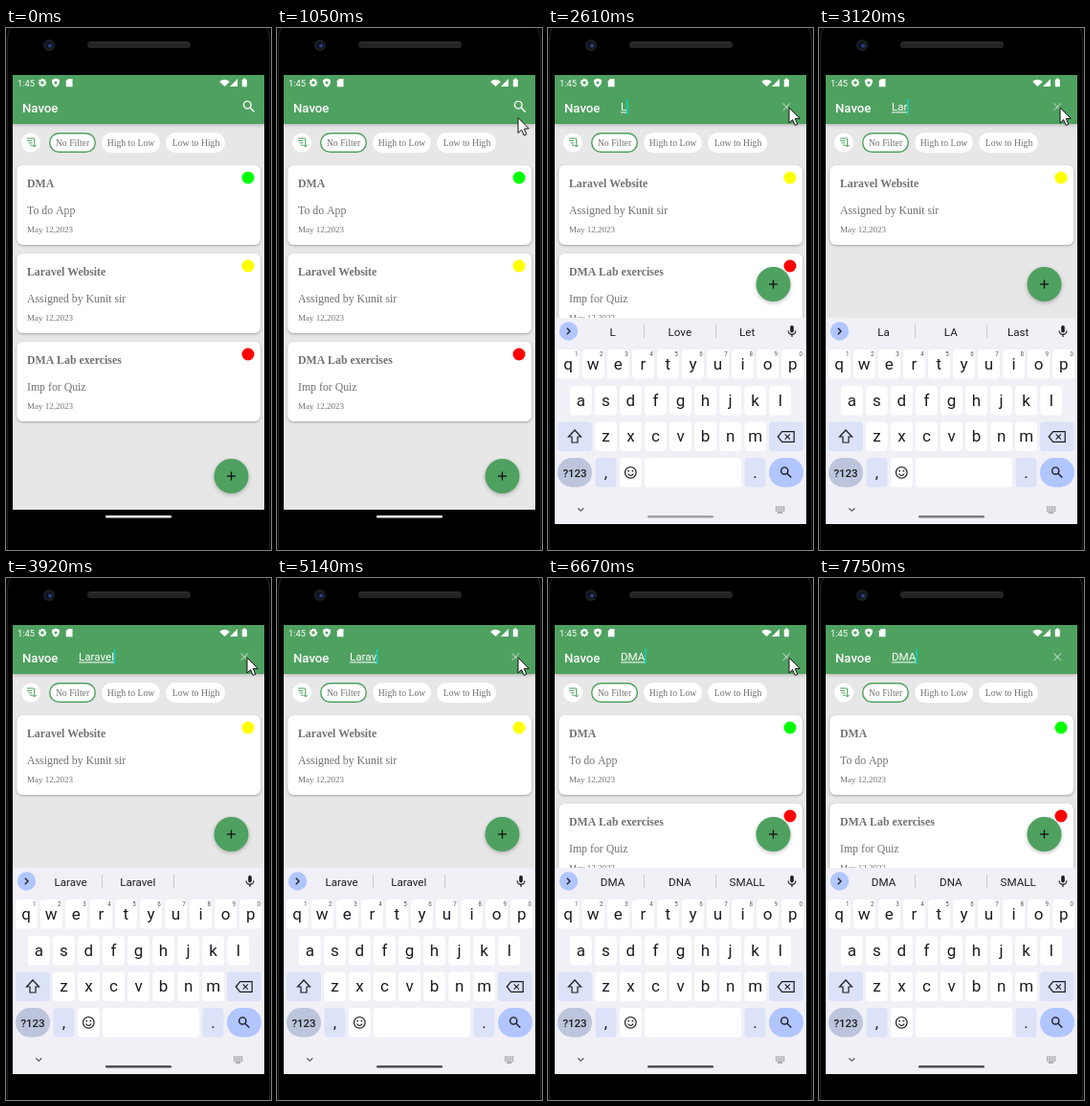
Animation of 277x544 px, one loop 8 s. Source, as an HTML page with a canvas:

```html
<!DOCTYPE html>
<html lang="en">
<head>
<meta charset="utf-8">
<title>Todo search</title>
<style>
html, body { margin: 0; width: 100%; height: 100%; overflow: hidden; background: #000; }
canvas { display: block; width: 277px; height: 544px; }
</style>
</head>
<body>
<canvas id="stage"></canvas>
<script>
const W = 277, H = 544, LOOP = 8000;
const canvas = document.getElementById('stage');
const ratio = window.devicePixelRatio || 1;
canvas.width = W * ratio;
canvas.height = H * ratio;
const c = canvas.getContext('2d');

const SANS = 'Roboto, sans-serif', SERIF = '"Liberation Serif", serif';
const GREEN = '#4fa160', INK = '#1c1c22', SOFT = 'rgba(255,255,255,.45)';
const GRAY = '#727272', LILAC = '#dce2f8', BLUE = '#b1c5ff';

const tasks = [
  { title: 'DMA', note: 'To do App', dot: '#00ff00' },
  { title: 'Laravel Website', note: 'Assigned by Kunit sir', dot: '#ffff00' },
  { title: 'DMA Lab exercises', note: 'Imp for Quiz', dot: '#ff0000' }
];

// Tracks: [start time, value...]
const mouse = [[0], [530, 229, 348], [650, 250, 149], [1050, 252, 93.5], [1170, 252, 88.5],
  [1320, 252, 83], [7230, 259, 91], [7350]];
const typed = [[0, ''], [2490, 'L'], [3000, 'La'], [3120, 'Lar'], [3240, 'Lara'], [3380, 'Larav'],
  [3650, 'Laravel'], [4740, 'Larave'], [5140, 'Larav'], [5260, 'La'], [5380, ''],
  [6270, 'D'], [6550, 'DM'], [6670, 'DMA']];
const hints = [[0, ''], [2610, 'L,Love,Let'], [3000, 'La,LA,Last'], [3240, 'Lar,Large,Larry'],
  [3380, 'Lara,Large,Larry'], [3650, 'Larav,Larave,'], [3920, 'Larave,Laravel,'], [5530, ''],
  [6270, 'D,Do,Did'], [6550, 'DM,DMs,Done'], [6670, 'DMA,DNA,SMALL']];
const caret = [[0, true], [4470, false], [4740, true], [5840, false], [6270, true], [7230, false], [7750, true]];
const slide = [[0, null], [1980, 49.5], [2130, 12], [2250, 0]];
const pill = [[0, '#f4f4f4'], [2610, '#a4a4a8'], [2850, '#7e7e83'], [3650, '#505055']];

const at = (track, t) => track.filter(s => s[0] <= t).pop();

function box(x, y, w, h, r, fill) {
  c.beginPath();
  c.roundRect(x, y, w, h, r);
  if (fill) { c.fillStyle = fill; c.fill(); }
}
function disc(x, y, r, fill) {
  c.beginPath();
  c.arc(x, y, r, 0, 7);
  c.fillStyle = fill;
  c.fill();
}
function line(color, width, ...pts) {
  c.beginPath();
  for (let i = 0; i < pts.length; i += 2) c.lineTo(pts[i], pts[i + 1]);
  outline(color, width);
}
function outline(color, width) {
  c.strokeStyle = color;
  c.lineWidth = width;
  c.stroke();
}
function text(s, x, y, font, color, align = 'left') {
  c.font = font;
  c.fillStyle = color;
  c.textAlign = align;
  c.fillText(s, x, y);
}
function shadow(blur, dy, alpha) {
  c.shadowColor = `rgba(0,0,0,${alpha})`;
  c.shadowBlur = blur * ratio;
  c.shadowOffsetY = dy * ratio;
}
const flat = () => shadow(0, 0, 0);

function lens(x, y, r, color, w) {
  c.beginPath();
  c.arc(x - r * .35, y - r * .35, r, 0, 7);
  outline(color, w);
  line(color, w, x + r * .4, y + r * .4, x + r * 1.6, y + r * 1.6);
}
function gear(x, y, r, fill, hole) {
  c.beginPath();
  for (let i = 0; i < 32; i++) {
    const a = i * Math.PI / 16, d = (i + 1) % 4 < 2 ? r : r * .8;
    c.lineTo(x + d * Math.cos(a), y + d * Math.sin(a));
  }
  c.fillStyle = fill;
  c.fill();
  disc(x, y, r * .4, hole);
}
function mic(x, y) {
  box(x - 1.8, y - 6, 3.6, 7.5, 1.8, INK);
  c.beginPath();
  c.arc(x, y - .5, 3.9, 0, Math.PI);
  outline(INK, 1.2);
  line(INK, 1.2, x, y + 3.4, x, y + 6);
}

function phone() {
  c.fillStyle = '#000';
  c.fillRect(0, 0, W, H);
  box(1.5, -14, 274, 600, 26);
  outline('#202022', 1.2);
  disc(45, 18, 6, '#1d1e22');
  disc(45, 18, 3.8, '#10131f');
  disc(46, 18.5, 2, '#2c3f86');
  box(85, 14, 108, 7, 3, '#242426');
  line('#323234', 1, 88, 15, 190, 15);
}

function statusBar() {
  text('1:45', 12, 60.5, '9.3px ' + SANS, '#fff');
  gear(38, 57, 4.4, '#fff', GREEN);
  c.beginPath();
  c.moveTo(52, 52.5);
  c.lineTo(56, 54);
  c.quadraticCurveTo(56.3, 59.5, 52, 61.8);
  c.quadraticCurveTo(47.7, 59.5, 48, 54);
  c.fillStyle = '#fff';
  c.fill();
  disc(52, 57, 1.5, GREEN);
  c.beginPath();
  [[65, 53], [69.5, 53], [69.5, 61.3], [62.8, 61.3], [62.8, 55.3]].forEach(p => c.lineTo(...p));
  c.fillStyle = '#fff';
  c.fill();
  c.beginPath();
  c.moveTo(228.5, 61);
  c.arc(228.5, 61, 7.3, -Math.PI * .76, -Math.PI * .24);
  c.fill();
  c.beginPath();
  [[242, 53], [242, 61], [234, 61]].forEach(p => c.lineTo(...p));
  c.fill();
  box(246.8, 53.4, 5, 7.8, .8, '#fff');
  c.fillRect(248.3, 52.4, 2, 1.4);
}

function appBar(t) {
  shadow(4, 1, .25);
  c.fillStyle = GREEN;
  c.fillRect(7, 49, 263, 51);
  flat();
  statusBar();
  text('Navoe', 17, 87.5, '500 13.2px ' + SANS, '#fff');
  if (t < 1860) {
    lens(253.6, 81.5, 3.8, '#fff', 1.4);
    return;
  }
  line(SOFT, 1.1, 245.5, 78.5, 253, 86);
  line(SOFT, 1.1, 253, 78.5, 245.5, 86);
  const query = at(typed, t)[1];
  if (query) {
    text(query, 76, 86, '11.6px ' + SANS, '#fff');
  } else {
    lens(84.6, 82.8, 3.4, SOFT, 1.1);
    text('Search your Todo task h…', 95.5, 87, '11.6px ' + SANS, SOFT);
  }
  c.font = '11.6px ' + SANS;
  const w = c.measureText(query).width;
  c.fillStyle = '#fff';
  c.fillRect(76, 87.4, w, 1);
  if (at(caret, t)[1]) {
    c.fillStyle = '#03dac5';
    c.fillRect(76 + w - .2, 74, 1.3, 16);
  }
}

function chips() {
  const font = '9.7px ' + SERIF;
  disc(26, 119.5, 10, '#fff');
  [[22, 115, 29], [22, 117.4, 27.5], [23.5, 119.8, 27.5], [25, 122.2, 27.5]]
    .forEach(([x, y, end]) => line(GREEN, 1, x, y, end, y));
  line(GREEN, 1.1, 29.7, 115, 29.7, 123.5);
  line(GREEN, 1, 27.7, 121.8, 29.7, 124, 31.7, 121.8);
  box(45.7, 109.7, 47.6, 19.6, 9.8, '#fff');
  outline(GREEN, 1.4);
  box(100, 109, 61, 21, 10.5, '#fff');
  box(167, 109, 62, 21, 10.5, '#fff');
  text('No Filter', 69.5, 123, font, GRAY, 'center');
  text('High to Low', 130.5, 123, font, GRAY, 'center');
  text('Low to High', 198.5, 123, font, GRAY, 'center');
}

function card(task, y) {
  shadow(2.5, 1, .3);
  box(11.3, y, 254.7, 83, 6, '#fff');
  flat();
  text(task.title, 22, y + 23, 'bold 11.8px ' + SERIF, GRAY);
  text(task.note, 22, y + 51, '11.8px ' + SERIF, GRAY);
  text('May 12,2023', 22, y + 70, '9px ' + SERIF, GRAY);
  disc(253, y + 13, 6.5, task.dot);
}

function fab(y) {
  shadow(4, 1.5, .25);
  disc(235.5, y, 18, GREEN);
  flat();
  line('#111', 1.3, 231, y, 240, y);
  line('#111', 1.3, 235.5, y - 4.5, 235.5, y + 4.5);
}

function toolbar(words) {
  disc(21.5, 316, 9.7, BLUE);
  const d = words ? 1 : -1;
  line(INK, 1.3, 21 - d * 1.2, 312.8, 21 + d * 2, 316, 21 - d * 1.2, 319.2);
  mic(255, 316);
  if (words) {
    words.split(',').forEach((w, i) => text(w, 67.5 + i * 70.3, 320.5, '11.6px ' + SANS, INK, 'center'));
    line('#c9c9d0', 1, 100.5, 309, 100.5, 323);
    line('#c9c9d0', 1, 175.5, 309, 175.5, 323);
    return;
  }
  // sticker with a folded corner
  line(INK, 1.2, 60, 321, 54.3, 321, 54.3, 311.2, 64, 311.2, 64, 317, 60, 321);
  line(INK, 1, 60, 321, 60, 317, 64, 317);
  disc(57.4, 314.3, .8, INK);
  disc(61, 314.3, .8, INK);
  text('GIF', 96.5, 319.6, 'bold 9.5px ' + SANS, INK, 'center');
  box(129.5, 311.3, 9.2, 9.8, 1);
  outline(INK, 1.1);
  box(131.8, 309.8, 4.6, 2.8, 1, INK);
  for (const y of [314.8, 316.8, 318.8]) line(INK, .8, 131.6, y, 136.6, y);
  gear(171.5, 316, 5.6, INK, '#f1f0f7');
  line('#c9c9d0', 1, 194.5, 309, 194.5, 323);
  for (const x of [213, 217, 221]) disc(x, 316, 1.1, INK);
}

function keys() {
  const big = '17px ' + SANS;
  const key = (x, y, w, fill = '#fff', r = 4) => box(x, y, w, 30.5, r, fill);
  [['qwertyuiop', 21.2, 335], ['asdfghjkl', 34.3, 373], ['zxcvbnm', 60.4, 410.5]].forEach(([row, x0, y], n) => {
    [...row].forEach((ch, i) => {
      const x = x0 + i * 26.05;
      key(x - 11.4, y, 22.8);
      text(ch, x, y + 20.8, big, INK, 'center');
      if (!n) text(String((i + 1) % 10), x + 8.6, y + 7.4, '6.3px ' + SANS, '#55555c', 'center');
    });
  });
  key(10, 410.5, 36, LILAC);
  c.beginPath();
  [[28, 419], [34.5, 426], [31, 426], [31, 432], [25, 432], [25, 426], [21.5, 426]]
    .forEach(p => c.lineTo(...p));
  c.closePath();
  outline(INK, 1.2);
  key(231, 410.5, 36, LILAC);
  c.beginPath();
  [[240.3, 426], [244.7, 420.7], [257.2, 420.7], [257.2, 431.3], [244.7, 431.3]].forEach(p => c.lineTo(...p));
  c.closePath();
  outline(INK, 1.2);
  line(INK, 1.1, 247.7, 423.4, 252.9, 428.6);
  line(INK, 1.1, 252.9, 423.4, 247.7, 428.6);

  key(10, 448, 36, '#bcc5db', 15);
  text('?123', 28, 467.6, '500 11.5px ' + SANS, INK, 'center');
  key(49.5, 448, 22, LILAC);
  text(',', 60.5, 468.5, big, INK, 'center');
  key(75, 448, 22.8);
  c.beginPath();
  c.arc(86.3, 463.3, 5.8, 0, 7);
  outline(INK, 1.2);
  disc(84.2, 461.6, .9, INK);
  disc(88.4, 461.6, .9, INK);
  c.beginPath();
  c.arc(86.3, 463.6, 2.8, .25, Math.PI - .25);
  outline(INK, 1.1);
  key(101, 448, 101);
  key(205.5, 448, 22, LILAC);
  text('.', 216.5, 468.5, big, INK, 'center');
  key(231, 448, 36, BLUE, 15);
  lens(248.5, 462.7, 3.6, INK, 1.4);

  line('#4a4a50', 1.1, 31.3, 500.5, 34.3, 503.3, 37.3, 500.5);
  for (let i = 0; i < 15; i++) {
    c.fillStyle = '#77777d';
    c.fillRect(238 + i % 5 * 2, 498.5 + Math.floor(i / 5) * 2, 1.2, 1.2);
  }
  c.fillRect(240, 504.5, 5.2, 1.1);
}

function keyboard(dy, words) {
  c.save();
  c.beginPath();
  c.rect(7, 302, 263, 215);
  c.clip();
  c.fillStyle = '#fff';
  c.fillRect(7, 302, 263, 215);
  // fades in while it rises, under a scrim on the navigation bar
  c.globalAlpha = 1 - dy / 300;
  c.translate(0, dy);
  c.fillStyle = '#f1f0f7';
  c.fillRect(7, 301.5, 263, 216);
  toolbar(words);
  keys();
  c.translate(0, -dy);
  c.globalAlpha = dy / 200;
  c.fillStyle = '#000';
  c.fillRect(7, 502, 263, 15);
  c.restore();
}

function pointer(x, y) {
  c.beginPath();
  [[0, 0], [0, 16], [3.6, 12.6], [6.2, 18.4], [8.8, 17.3], [6.3, 11.6], [11.2, 11.3]]
    .forEach(p => c.lineTo(x + p[0], y + p[1]));
  c.closePath();
  c.fillStyle = '#fff';
  c.fill();
  outline('#111', 1);
}

function draw(t) {
  c.setTransform(ratio, 0, 0, ratio, 0, 0);
  phone();
  const dy = at(slide, t)[1], open = dy !== null;
  const query = at(typed, t)[1].toLowerCase();
  c.save();
  c.beginPath();
  c.rect(7, 49, 263, open ? 253 : 453);
  c.clip();
  c.fillStyle = '#e7e7e7';
  c.fillRect(7, 49, 263, 453);
  tasks.filter(k => k.title.toLowerCase().includes(query)).forEach((k, i) => card(k, 143 + i * 92));
  chips();
  appBar(t);
  fab(open ? 267 : 467);
  c.restore();
  if (open) keyboard(dy, at(hints, t)[1]);
  box(104, 508, 69, 2.6, 1.3, at(pill, t)[1]);
  const [, x, y] = at(mouse, t);
  if (x) pointer(x, y);
}

const start = performance.now();
function tick() {
  draw((performance.now() - start) % LOOP);
  requestAnimationFrame(tick);
}
tick();
</script>
</body>
</html>
```
